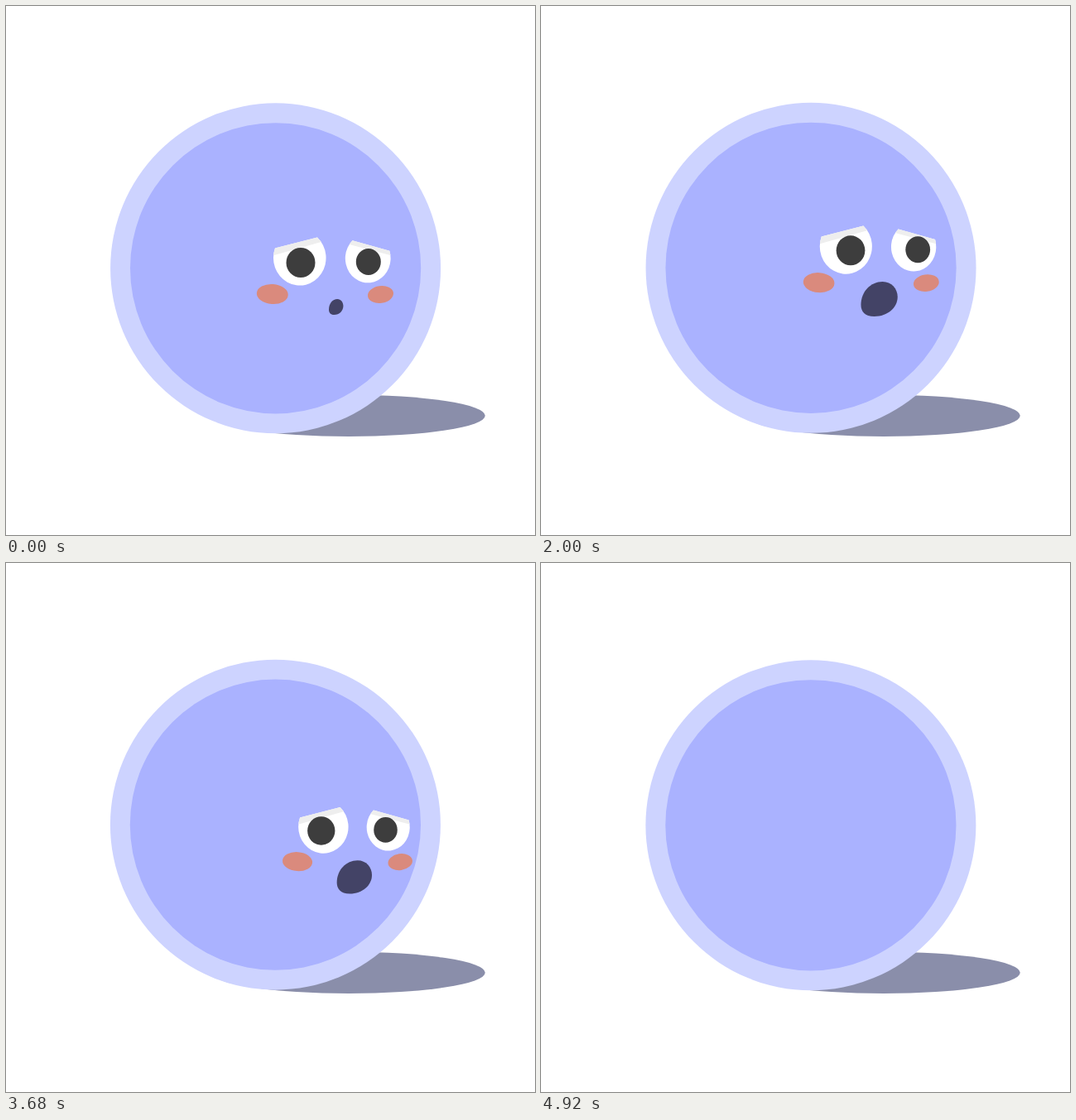
An HTML page that plays this animation: 639x639 px, repeating every 5000 ms.

```html
<!DOCTYPE html>
<html lang="en">
<head>
<meta charset="utf-8">
<title>Worried ball</title>
<style>
  html, body { margin: 0; width: 100%; height: 100%; overflow: hidden; background: #fff; }
  svg { display: block; width: 100%; height: 100%; }
</style>
</head>
<body>
<svg viewBox="0 0 639 639">
  <defs>
    <clipPath id="disc"><circle id="discEdge" r="175.6"/></clipPath>
    <clipPath id="eyeL"><path d="M325 292.5L376 279.5A31.8 33.3 0 1 1 325 292.5Z"/></clipPath>
    <clipPath id="eyeR"><path d="M418.5 283.3L463.3 295.8A27.4 29.5 0 1 1 418.5 283.3Z"/></clipPath>
  </defs>
  <ellipse cx="413.8" cy="494.8" rx="165" ry="25.1" fill="#8a8eaa"/>
  <g id="ball">
    <circle r="199.5" fill="#cdd3ff"/>
    <circle r="175.6" fill="#aab2ff"/>
  </g>
  <g clip-path="url(#disc)">
    <g id="face">
      <g clip-path="url(#eyeL)">
        <path d="M320 275H390V340H320Z" fill="#fff"/>
        <path d="M320 275H390V282.5L320 302Z" fill="#eee"/>
      </g>
      <g clip-path="url(#eyeR)">
        <path d="M405 278H468V338H405Z" fill="#fff"/>
        <path d="M405 278H468V302L405 285.5Z" fill="#eee"/>
      </g>
      <g id="pupils" fill="#3d3d3d">
        <ellipse cx="356" cy="310" rx="17.5" ry="18"/>
        <ellipse cx="437.8" cy="309" rx="15" ry="16"/>
      </g>
      <g fill="#da8a7d">
        <ellipse cx="321.8" cy="348" rx="19" ry="12" transform="rotate(4 321.8 348)"/>
        <ellipse cx="452.5" cy="348.5" rx="15.6" ry="10.3" transform="rotate(-8 452.5 348.5)"/>
      </g>
      <path id="mouth" fill="#434366" d="M4-21C15-21 22.3-12.5 22.3-2.5C22.3 10 10.3 21-6 21C-17.7 21-22.3 15-22.3 7C-22.3-9-10.5-21 4-21Z"/>
    </g>
  </g>
</svg>
<script>
const LOOP = 5000, STEP = 40;
const el = id => document.getElementById(id);
const mix = (a, b, k) => a + (b - a) * k;

// Eased progress from 0 to 1 between two times.
function ramp(t, from, to) {
  const k = Math.min(Math.max((t - from) / (to - from), 0), 1);
  return k * k * (3 - 2 * k);
}

function place(id, x, y, sx = 1, sy = 1) {
  el(id).setAttribute('transform', `translate(${x} ${y}) scale(${sx} ${sy})`);
}

function draw(t) {
  const gasp = ramp(t, 0, 520);
  const drift = ramp(t, 0, 1160);
  const lookUp = ramp(t, 1160, 1680) - ramp(t, 2260, 2780);
  const turn = ramp(t, 3320, 4800);

  // The ball sways by less than a pixel.
  const sway = Math.max(t - 1160, 0);
  const ballX = 325.6 + 0.5 * Math.sin(2 * Math.PI * sway / 2680);
  const ballY = 316.8 - 0.7 * Math.sin(Math.PI * sway / 3760);
  place('ball', ballX, ballY);
  place('discEdge', ballX, ballY);

  const gaze = 8.9 * lookUp - 4.4 * drift + 3 * turn;
  place('pupils', gaze, -0.8 * drift);
  place('mouth',
    mix(398.7, 394.9, gasp) + 0.1 * gaze - 2 * turn,
    mix(363.5, 367.9, gasp) - 3 * turn,
    mix(0.39, 1, gasp), mix(0.45, 1, gasp));

  // Turning away slides the face sideways while it shrinks about its middle.
  const x = 13.3 * lookUp + 180.5 * turn;
  const y = 13 * gasp - 26.9 * lookUp;
  const sx = 1 - 0.0075 * lookUp - 0.335 * turn, sy = 1 - 0.275 * turn;
  el('face').setAttribute('transform',
    `translate(${390 + x} ${339 + y}) scale(${sx} ${sy}) translate(-390 -339)`);
}

const start = performance.now();
function tick() {
  const t = (performance.now() - start) % LOOP;
  draw(Math.floor(t / STEP) * STEP);
  requestAnimationFrame(tick);
}
draw(0);
requestAnimationFrame(tick);
</script>
</body>
</html>
```
